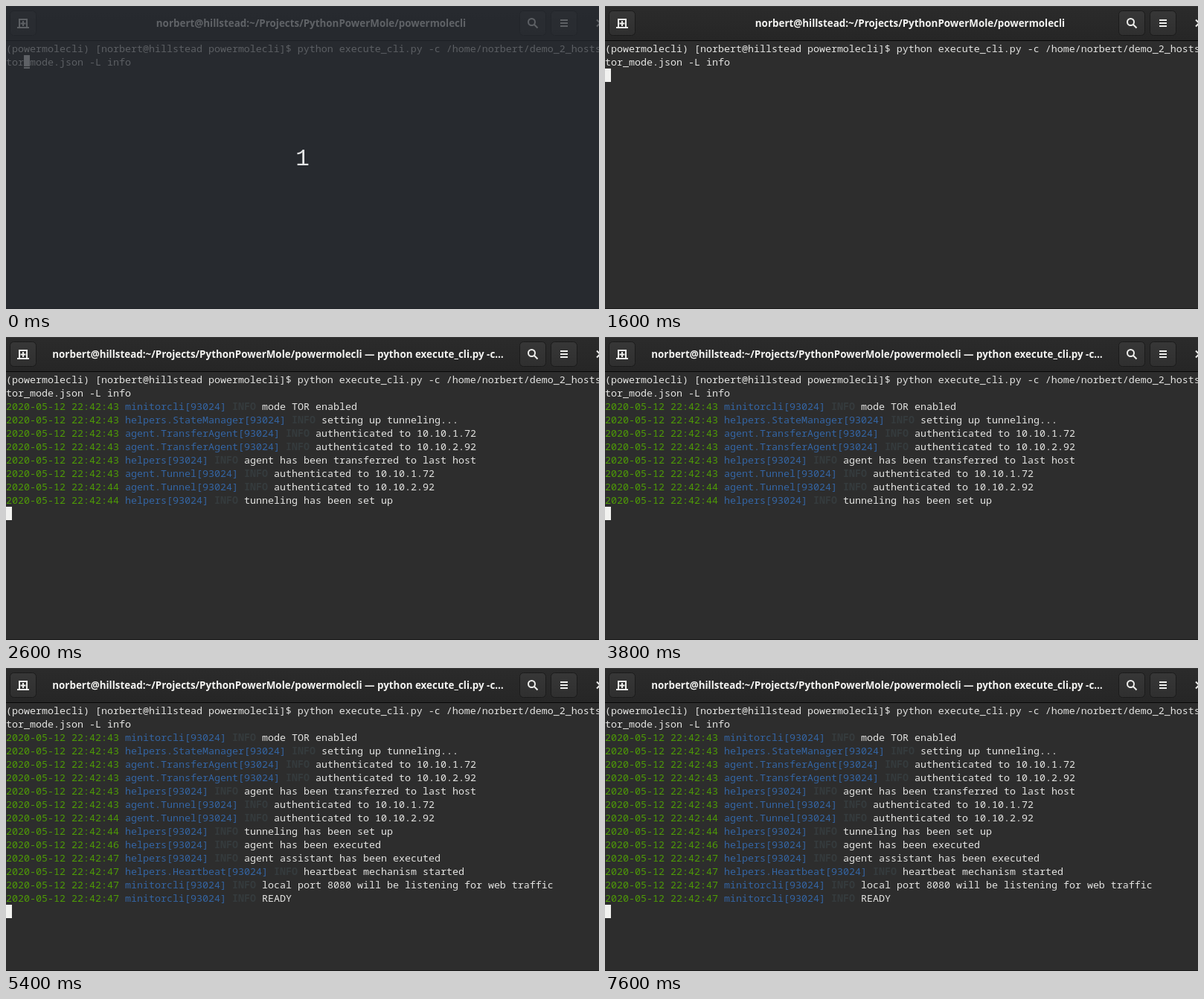
Write an HTML page with a canvas that moves like this. It is 797 by 407 pixels and loops after 8 s.

```html
<!DOCTYPE html>
<html lang="en">
<head>
<meta charset="utf-8">
<style>
  html, body { margin: 0; width: 100%; height: 100%; overflow: hidden; background: #2d2d2d; }
  canvas { display: block; }
</style>
</head>
<body>
<canvas id="stage" width="797" height="407"></canvas>
<script>
const ctx = document.getElementById('stage').getContext('2d');
const LOOP = 8000, COL = 8, ROW = 18, TOP = 48;
const MONO = '13.3333px "Noto Sans Mono", monospace';
const GREEN = '#4e9a06', BLUE = '#3465a4', DIM = '#353b3d', TEXT = '#e4e4e2', CURSOR = '#f2f2f0';

const cwd = 'norbert@hillstead:~/Projects/PythonPowerMole/powermolecli';
const command = [
  '(powermolecli) [norbert@hillstead powermolecli]$ python execute_cli.py -c /home/norbert/demo_2_hosts',
  'tor_mode.json -L info',
];

// [time shown, seconds of the stamp, logger, message]
const log = [
  [2000, 43, 'minitorcli', 'mode TOR enabled'],
  [2000, 43, 'helpers.StateManager', 'setting up tunneling...'],
  [2000, 43, 'agent.TransferAgent', 'authenticated to 10.10.1.72'],
  [2000, 43, 'agent.TransferAgent', 'authenticated to 10.10.2.92'],
  [2000, 43, 'helpers', 'agent has been transferred to last host'],
  [2000, 43, 'agent.Tunnel', 'authenticated to 10.10.1.72'],
  [2400, 44, 'agent.Tunnel', 'authenticated to 10.10.2.92'],
  [2600, 44, 'helpers', 'tunneling has been set up'],
  [5000, 46, 'helpers', 'agent has been executed'],
  [5400, 47, 'helpers', 'agent assistant has been executed'],
  [5400, 47, 'helpers.Heartbeat', 'heartbeat mechanism started'],
  [5400, 47, 'minitorcli', 'local port 8080 will be listening for web traffic'],
  [5400, 47, 'minitorcli', 'READY'],
];

// Times at which the cursor turns on and off, alternating
const blinks = [0, 400, 1000, 2000, 2600, 3200, 3800, 4400, 5000, 5600, 6200, 7000, 7600];

function label(text, x, y, font, color, align = 'left') {
  ctx.font = font;
  ctx.fillStyle = color;
  ctx.textAlign = align;
  ctx.fillText(text, x, y);
}

function cells(text, col, row, color, weight = '') {
  label(text, col * COL, TOP + row * ROW + 14, weight + MONO, color);
}

function verticalFill(y0, y1, from, to) {
  const fill = ctx.createLinearGradient(0, y0, 0, y1);
  fill.addColorStop(0, from);
  fill.addColorStop(1, to);
  return fill;
}

function button(x) {
  ctx.beginPath();
  ctx.roundRect(x + 0.5, 6.5, 35, 33, 5);
  ctx.fillStyle = verticalFill(6, 40, '#373737', '#2f2f2f');
  ctx.fill();
  ctx.strokeStyle = '#1b1b1b';
  ctx.lineWidth = 1;
  ctx.stroke();
}

function icon(path, width = 2) {
  ctx.strokeStyle = '#eeeeec';
  ctx.lineWidth = width;
  ctx.stroke(new Path2D(path));
}

function drawHeader(title, center) {
  ctx.fillStyle = verticalFill(0, 46, '#2b2b2b', '#262626');
  ctx.fillRect(0, 0, 797, 46);
  ctx.fillStyle = '#383838';
  ctx.fillRect(0, 0, 797, 1);
  ctx.fillStyle = '#070707';
  ctx.fillRect(0, 46, 797, 1);
  [5, 690, 732].forEach(button);
  icon('M15 29H31M18 29V18H28V29M23 20V27M19.5 23.5H26.5');
  icon('M711 21.5a4.5 4.5 0 1 0 -9 0a4.5 4.5 0 1 0 9 0M709.5 24.5L714.5 29.5');
  icon('M745 19H755M745 23H755M745 27H755');
  icon('M794 18.5L803 27.5M794 27.5L803 18.5');
  label(title, center, 28, 'bold 13.4px "Open Sans", sans-serif', '#f4f4f2', 'center');
}

function drawLog([, seconds, logger, message], row) {
  const name = logger + '[93024]', level = 21 + name.length;
  cells('2020-05-12 22:42:' + seconds, 0, row, GREEN);
  cells(name, 20, row, BLUE);
  cells('INFO', level, row, DIM, 'bold ');
  cells(message, level + 5, row, TEXT);
}

function drawCursor(t, row) {
  if (blinks.filter(b => b <= t).length % 2 === 0) return;
  const typing = t < 1600, col = typing ? 3 : 0;
  ctx.fillStyle = CURSOR;
  ctx.fillRect(col * COL, TOP + (typing ? 1 : row) * ROW, COL, ROW);
  if (typing) cells('_', col, 1, '#2d2d2d');
}

function drawCountdown() {
  ctx.fillStyle = 'rgba(38, 42, 49, 0.72)';
  ctx.fillRect(0, 0, 797, 407);
  label('1', 398.5, 214, '31px "Liberation Mono", monospace', '#e4e5e6', 'center');
}

function draw(t) {
  ctx.fillStyle = '#2d2d2d';
  ctx.fillRect(0, 0, 797, 407);
  if (t < 2000) drawHeader(cwd, 410);
  else drawHeader(cwd + ' — python execute_cli.py -c…', 365.5);
  command.forEach((line, row) => cells(line, 0, row, TEXT));
  const shown = log.filter(([time]) => time <= t);
  shown.forEach((entry, i) => drawLog(entry, i + 2));
  drawCursor(t, shown.length + 2);
  ctx.fillStyle = '#1a1a1a';
  ctx.fillRect(0, 406, 797, 1);
  if (t < 200) drawCountdown();
}

const start = performance.now();
function tick() {
  draw((performance.now() - start) % LOOP);
  requestAnimationFrame(tick);
}
tick();
</script>
</body>
</html>
```
